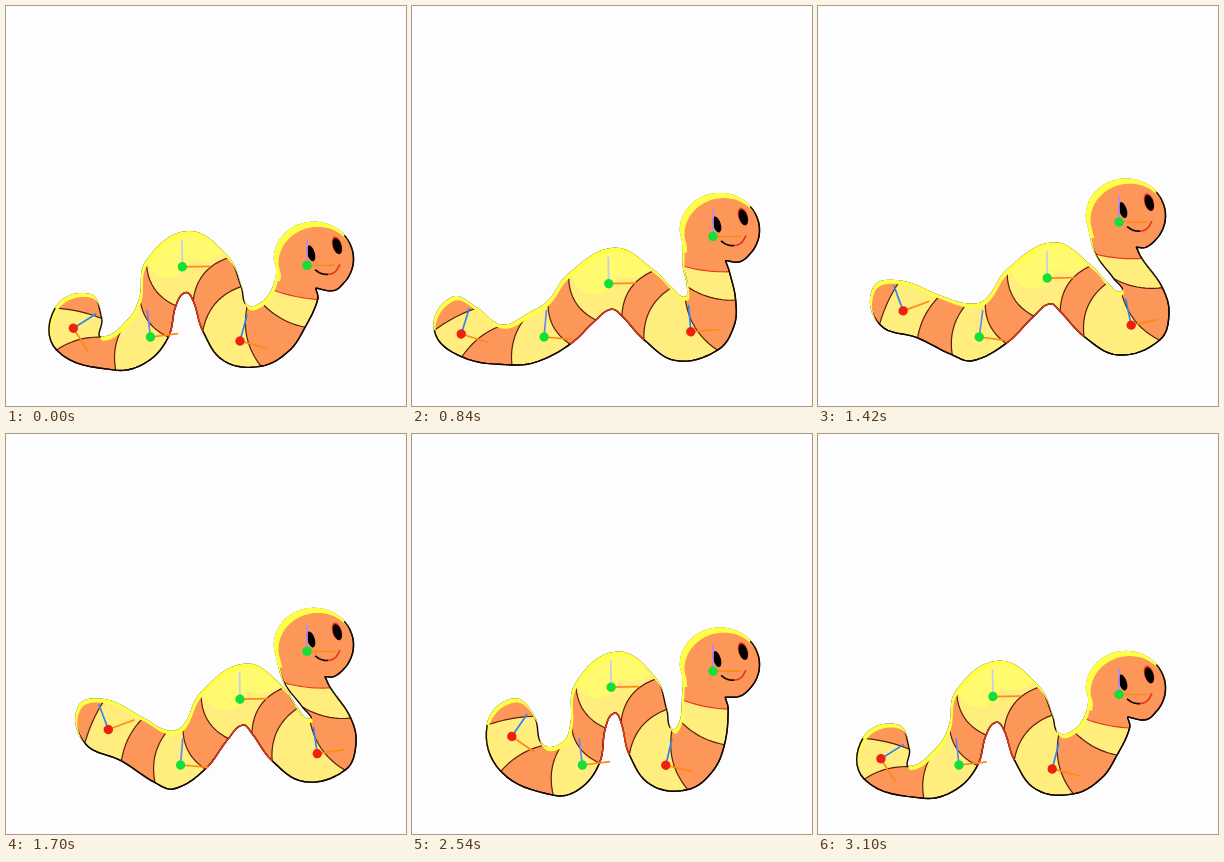
Recreate the animation shown at these times as an HTML page with a canvas. Size 400 px wide and 400 px high, loop 3120 ms.

```html
<!DOCTYPE html>
<html lang="en">
<head>
<meta charset="utf-8">
<title>Worm</title>
<style>
html, body { margin: 0; width: 100%; height: 100%; overflow: hidden; background: #fdfdff; }
canvas { display: block; width: 400px; height: 400px; }
</style>
</head>
<body>
<canvas id="stage" width="400" height="400"></canvas>
<script>
const ctx = document.getElementById('stage').getContext('2d');
const LOOP = 3120, CYCLE = 65.5, REST = 49, STEPS = 8;
const ORANGE = '#fd9659', YELLOW = '#ffee7e', RIM = '#ffff48', INK = '#140804', RED = '#e8361a';
const BLUE = '#2f86f0', GREEN = '#12e038', DOT = '#ee2010';
const TAU = Math.PI * 2, RAD = Math.PI / 180;

// The five pins that pull the body, tail to head, each swinging on a sine
function pinsAt(step) {
  const wave = (mean, swing, peak, speed = 1) =>
    mean + swing * Math.cos(speed * step / CYCLE * TAU - peak * RAD);
  return [
    { x: wave(79, 34, 250), y: wave(312, 20.5, 60), turn: wave(18, 40, 8), dot: DOT, axis: BLUE },
    { x: wave(155, 27, 247), y: 331, turn: wave(0, 8, 150), dot: GREEN, axis: '#6a86f0' },
    { x: wave(204, 30, 203), y: wave(265.5, 12.5, 112), turn: -1, dot: GREEN, axis: '#c4ccf4' },
    { x: wave(274, 40, 182), y: wave(327, 8, 0), turn: wave(2, 14, 340), dot: DOT, axis: BLUE },
    { x: 301, y: wave(234, 22, 12) + wave(0, 5, 40, 2), turn: 0, dot: GREEN, axis: '#b58cf0' }
  ];
}
const restPins = pinsAt(REST);

// Stripe edges at rest; u places each between the pins (0 tail, 4 head).
// crest and under round the outline before the next edge.
const ribs = [
  { u: 0, back: [124, 267], belly: [84, 293] },
  { u: .35, back: [145, 297], belly: [109, 333] },
  { u: .85, back: [164, 303], belly: [154, 357], under: [176, 355] },
  { u: 1.25, back: [172, 290], belly: [199, 330] },
  { u: 1.75, back: [180, 250], belly: [209, 295], crest: [222, 219], under: [219, 280] },
  { u: 2.2, back: [260, 245], belly: [226, 289] },
  { u: 2.65, back: [271, 273], belly: [237, 321], under: [262, 349] },
  { u: 2.95, back: [278, 291], belly: [300, 349], under: [320, 328] },
  { u: 3.3, back: [280, 280], belly: [326, 300] },
  { u: 3.75, back: [274, 256], belly: [320, 264] }
];
const shape = buildShape();

function buildShape() {
  const back = [], belly = [], head = [], chin = [316, 252, 3.8];
  ribs.forEach((r, i) => {
    const mid = (r.u + ribs[Math.min(i + 1, 9)].u) / 2;
    r.backAt = back.push([...r.back, r.u]);
    r.bellyAt = belly.push([...r.belly, r.u]);
    if (r.crest) back.push([...r.crest, mid]);
    if (r.under) belly.push([...r.under, mid]);
  });
  for (const r of ribs) {
    r.backAt += belly.length + 1;
    r.bellyAt = belly.length + 1 - r.bellyAt;
  }
  for (let a = 160; a <= 420; a += 20) {
    head.push([308 + 39.5 * Math.cos(a * RAD), 219 + 36.5 * Math.sin(a * RAD), 4]);
  }
  return [chin, ...belly.reverse(), [98, 259, 0], ...back, ...head, chin];
}

// Carries a rest point along with the two pins around it
function skin([x, y, u], pins) {
  const k = Math.min(Math.floor(u), 3), out = [0, 0];
  for (const i of [k, k + 1]) {
    const w = 1 - Math.abs(u - i), from = restPins[i], to = pins[i];
    const dx = x - from.x, dy = y - from.y, a = (to.turn - from.turn) * RAD;
    out[0] += w * (to.x + dx * Math.cos(a) - dy * Math.sin(a));
    out[1] += w * (to.y + dx * Math.sin(a) + dy * Math.cos(a));
  }
  return out;
}

const dist = (a, b) => Math.hypot(b[0] - a[0], b[1] - a[1]) || 1;

// Samples a smooth curve through the nodes, STEPS samples per span
function spline(nodes) {
  const last = nodes.length - 1, out = [];
  const slope = nodes.map((_, i) => {
    const a = nodes[Math.max(i - 1, 0)], b = nodes[Math.min(i + 1, last)], len = dist(a, b);
    return [(b[0] - a[0]) / len, (b[1] - a[1]) / len];
  });
  for (let i = 0; i < last; i++) {
    const p = nodes[i], q = nodes[i + 1], pull = dist(p, q) * 1.1;
    for (let s = 0; s < STEPS; s++) {
      const u = s / STEPS, u2 = u * u, u3 = u2 * u;
      out.push([0, 1].map(k => p[k] + (q[k] - p[k]) * (3 * u2 - 2 * u3) +
        pull * (slope[i][k] * (u3 - 2 * u2 + u) + slope[i + 1][k] * (u3 - u2))));
    }
  }
  return [...out, nodes[last]];
}

function path(points, closed) {
  const p = new Path2D();
  points.forEach(([x, y]) => p.lineTo(x, y));
  if (closed) p.closePath();
  return p;
}

function line(p, color, width) {
  ctx.strokeStyle = color;
  ctx.lineWidth = width;
  ctx.stroke(p);
}

function ellipse(x, y, rx, ry, turn, color) {
  ctx.fillStyle = color;
  ctx.beginPath();
  ctx.ellipse(x, y, rx, ry, turn, 0, TAU);
  ctx.fill();
}

// Stripe edge from back to belly, bowed toward the tail, most at mid-body
function edge(nodes, rib, i) {
  const a = nodes[rib.backAt], b = nodes[rib.bellyAt];
  const bow = .08 + .24 * Math.sin(Math.PI * i / 9);
  const cx = (a[0] + b[0]) / 2 - (b[1] - a[1]) * bow;
  const cy = (a[1] + b[1]) / 2 + (b[0] - a[0]) * bow;
  return Array.from({ length: 13 }, (_, n) => {
    const u = n / 12, w = 1 - u;
    return [w * w * a[0] + 2 * u * w * cx + u * u * b[0], w * w * a[1] + 2 * u * w * cy + u * u * b[1]];
  });
}

// Lit band: the part of the body left bare by a shifted copy of itself
function rim(outline, body, dx, dy, box) {
  const outside = new Path2D();
  outside.rect(0, 0, 400, 400);
  outside.addPath(path(outline.map(([x, y]) => [x + dx, y + dy]), true));
  ctx.save();
  ctx.beginPath();
  ctx.rect(...box);
  ctx.clip();
  ctx.clip(outside, 'evenodd');
  ctx.fillStyle = RIM;
  ctx.fill(body);
  line(body, RIM, 1.4);
  ctx.restore();
}

function drawPin({ x, y, turn, dot, axis }) {
  ctx.save();
  ctx.translate(x, y);
  ctx.rotate(turn * RAD);
  line(path([[0, 0], [28, 0]]), '#ff8a14', 1.7);
  line(path([[0, 0], [0, -27]]), axis, 1.7);
  ellipse(0, 0, 4.7, 4.7, 0, dot);
  ctx.restore();
}

function drawFace({ x, y }) {
  ctx.save();
  ctx.translate(x, y);
  ellipse(4, -12, 3.8, 8.3, -.3, '#000');
  ellipse(30, -20, 4.8, 9.2, -.3, RED);
  ellipse(30.3, -19.2, 4.2, 8.2, -.3, '#000');
  const smile = spline([[8, 4.5], [14, 8], [21, 9], [28, 6.5], [33, -1]]);
  line(path(smile.slice(0, 17)), INK, 1.7);
  line(path(smile.slice(16)), RED, 1.7);
  ctx.restore();
}

function drawStripe(a, b, edgeA, edgeB, span) {
  const stripe = path([
    ...edgeA,
    ...span(b.bellyAt, a.bellyAt).reverse(),
    ...[...edgeB].reverse(),
    ...span(a.backAt, b.backAt).reverse()
  ], true);
  ctx.fillStyle = YELLOW;
  ctx.fill(stripe);
  if (!a.crest) return;
  const [x, y] = span(a.backAt + 1, a.backAt + 1)[0];
  ctx.save();
  ctx.clip(stripe);
  ellipse(x - 20, y + 24, 22, 22, 0, 'rgba(255,255,105,.7)');
  ellipse(x + 14, y + 11, 24, 18, 0, 'rgba(255,255,105,.7)');
  ctx.restore();
}

function draw(step) {
  const pins = pinsAt(step), head = pins[4];
  const nodes = shape.map(p => skin(p, pins));
  const outline = spline(nodes);
  const span = (a, b) => outline.slice(a * STEPS, b * STEPS + 1);
  const body = path(outline, true);
  const edges = ribs.map((r, i) => edge(nodes, r, i));

  ctx.fillStyle = '#fdfdff';
  ctx.fillRect(0, 0, 400, 400);
  ctx.lineJoin = 'round';
  ctx.fillStyle = ORANGE;
  ctx.fill(body);
  for (let i = 0; i < 10; i += 2) drawStripe(ribs[i], ribs[i + 1], edges[i], edges[i + 1], span);
  edges.forEach((e, i) => line(path(e), i === 9 ? RED : '#5c1e08', 1.2));

  line(body, INK, 1.4);
  rim(outline, body, 1.5, 3.5, [0, 0, 400, 400]);
  rim(outline, body, 4, 4.5, [262, head.y - 50, 75, 66]);
  line(path(span(0, ribs[0].bellyAt)), INK, 1.4);
  line(path(span(ribs[6].bellyAt, ribs[3].bellyAt)), RED, 1.4);
  line(path(span(nodes.length - 7, nodes.length - 1)), INK, 1.4);

  drawFace(head);
  pins.forEach(drawPin);
}

// Three steps per 140 ms, the middle one held longer
function stepAt(ms) {
  const t = ms % LOOP, r = t % 140;
  return Math.floor(t / 140) * 3 + (r < 20 ? 0 : r < 120 ? 1 : 2);
}

function tick() {
  draw(stepAt(performance.now()));
  requestAnimationFrame(tick);
}
tick();
</script>
</body>
</html>
```
